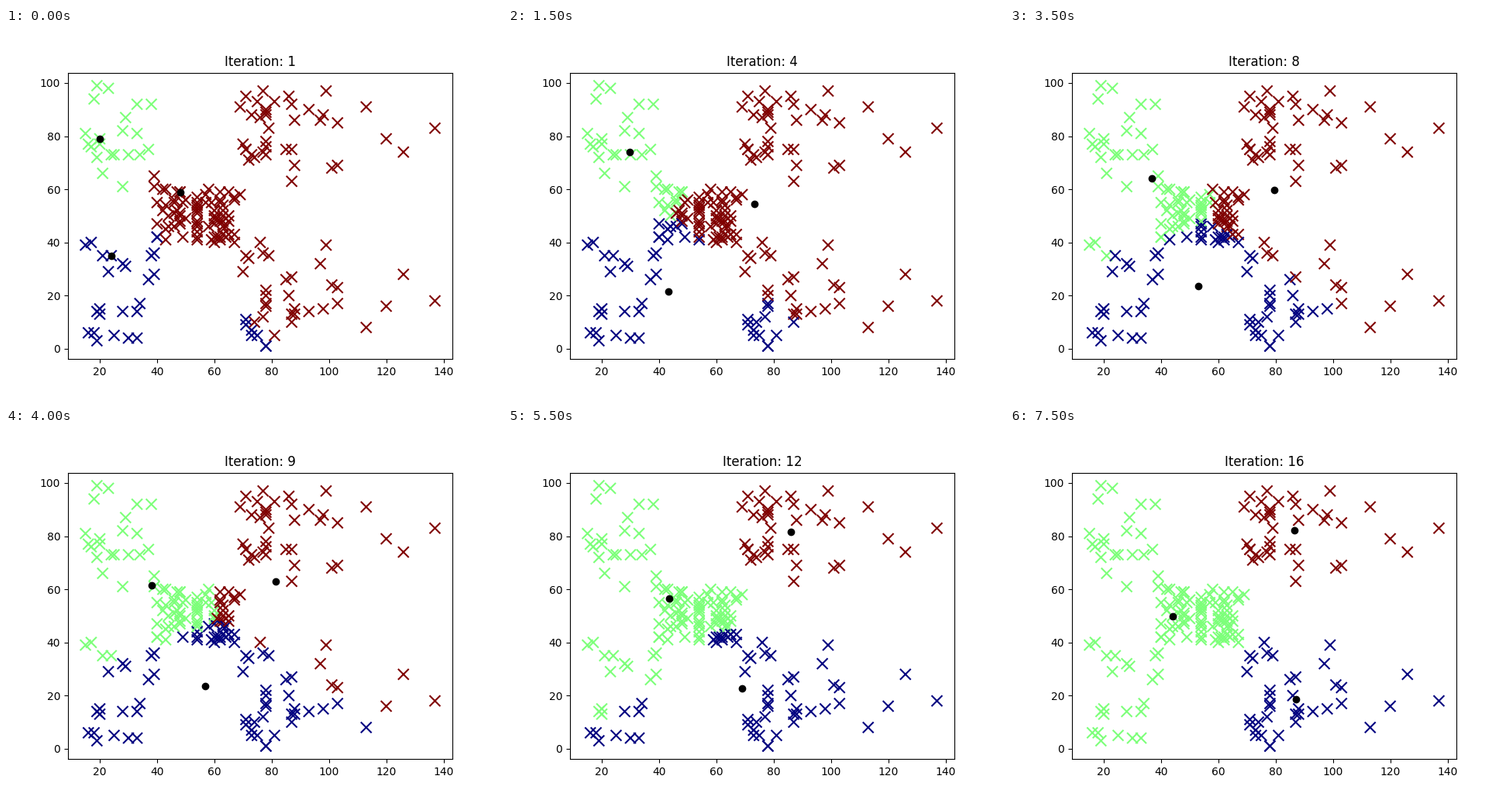
A matplotlib script for the animation above (8 s loop, 640x480 px).

```python
import numpy as np
import matplotlib.pyplot as plt
from matplotlib.animation import FuncAnimation

STEPS = 16
STEP_MS = 500


def paired(incomes, low, high):
    """Each income belongs to one low and one high spender."""
    return np.column_stack([np.repeat(incomes, 2),
                            np.column_stack([low, high]).ravel()])


modest = paired(
    [15, 16, 17, 18, 19, 19, 20, 20, 21, 23, 24, 25, 28, 28, 29, 30, 33, 33,
     34, 37, 38, 39, 39],
    [39, 6, 40, 6, 3, 14, 15, 13, 35, 29, 35, 5, 14, 32, 31, 4, 4, 14,
     17, 26, 35, 36, 28],
    [81, 77, 76, 94, 72, 99, 77, 79, 66, 98, 73, 73, 82, 61, 87, 73, 92, 81,
     73, 75, 92, 61, 65])

middle_scores = {
    40: [55, 47, 42, 42], 42: [52, 60], 43: [54, 60, 45, 41], 44: [50, 46],
    46: [51, 46, 56, 55], 47: [52, 59], 48: [51, 59, 50, 48, 59, 47],
    49: [55, 42], 50: [49, 56],
    54: [47, 54, 53, 48, 52, 42, 51, 55, 41, 44, 57, 46],
    57: [58, 55], 58: [60, 46], 59: [55, 41], 60: [49, 40, 42, 52, 47, 50],
    61: [42, 49], 62: [41, 48, 59, 55, 56, 42], 63: [50, 46, 43, 48, 52, 54],
    64: [42, 46], 65: [48, 50, 43, 59], 67: [43, 57, 56, 40], 69: [58, 91]}
middle = np.array([(x, y) for x, ys in middle_scores.items() for y in ys])

wealthy = paired(
    [70, 71, 71, 71, 72, 73, 73, 74, 75, 76, 77, 77] + [78] * 6
    + [79, 81, 85, 86, 87, 87, 87, 88, 88, 93, 97, 98, 99, 101, 103, 103,
       113, 120, 126, 137],
    [29, 35, 11, 9, 34, 5, 7, 10, 5, 40, 12, 36, 22, 17, 20, 16, 1, 1,
     35, 5, 26, 20, 27, 13, 10, 13, 15, 14, 32, 15, 39, 24, 17, 23,
     8, 16, 28, 18],
    [77, 95, 75, 75, 71, 88, 73, 72, 93, 87, 97, 74, 90, 88, 76, 89, 78, 73,
     83, 93, 75, 95, 63, 75, 92, 86, 69, 90, 86, 88, 97, 68, 85, 69,
     91, 79, 74, 83])

points = np.vstack([modest, middle, wealthy]).astype(float)


def nearest(centers):
    gaps = points[:, None, :] - centers[None, :, :]
    return (gaps ** 2).sum(axis=2).argmin(axis=1)


def k_means(centers, steps):
    history = []
    for _ in range(steps):
        labels = nearest(centers)
        history.append((centers, labels))
        centers = np.array([points[labels == k].mean(axis=0)
                            for k in range(len(centers))])
    return history


history = k_means(np.array([[24.0, 35.0], [20.0, 79.0], [48.0, 59.0]]), STEPS)

fig, ax = plt.subplots(figsize=(6.4, 4.8), dpi=100)
crosses = ax.scatter(*points.T, c=history[0][1], s=100, marker="x",
                     cmap="jet", vmin=0, vmax=2)
dots = ax.scatter(*history[0][0].T, c="black", s=36)
title = ax.set_title("Iteration: 1")
ax.set_xlim(8.9, 143.1)
ax.set_ylim(-3.9, 103.9)


def update(frame):
    centers, labels = history[frame]
    crosses.set_array(labels)
    dots.set_offsets(centers)
    title.set_text(f"Iteration: {frame + 1}")
    return crosses, dots, title


anim = FuncAnimation(fig, update, frames=STEPS, interval=STEP_MS,
                     repeat=True, repeat_delay=0)
plt.show()
```
